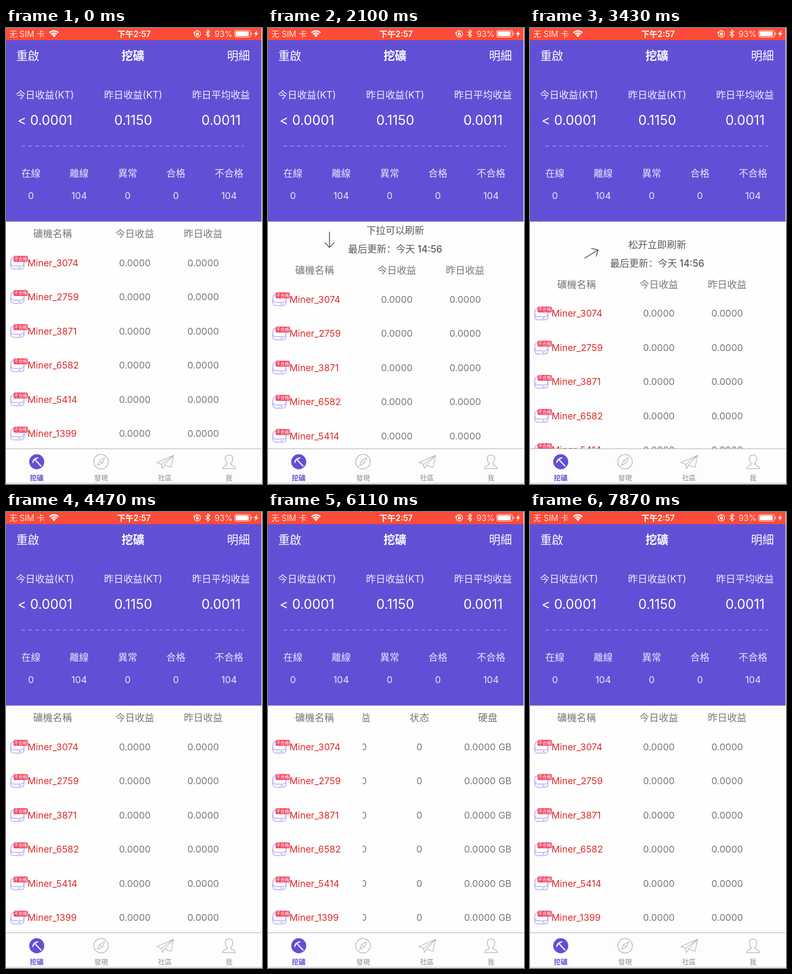
These frames come from a looping animation (483x861 px, 8 s). An HTML page with a canvas:

```html
<!DOCTYPE html>
<html lang="zh">
<head>
<meta charset="utf-8">
<title>挖礦</title>
<style>
html, body { margin: 0; width: 100%; height: 100%; overflow: hidden; background: #fff; }
canvas { display: block; width: 483px; height: 861px; }
</style>
</head>
<body>
<canvas id="stage" width="483" height="861"></canvas>
<script>
const ctx = document.getElementById('stage').getContext('2d');
const FONT = 'Inter, "Noto Sans CJK SC", "Noto Sans CJK TC", "Noto Sans CJK", sans-serif';
const LOOP = 8000, START = 1350, STEP = 148.2;
const PURPLE = '#6150d6', GREY = '#777', LINE = '#a2a2a2';
const BAR_END = 23, TABLE_TOP = 365.5, TAB_TOP = 794.5, NAME_EDGE = 178.5, COL = 129, END = -471;

const MINERS = [3074, 2759, 3871, 6582, 5414, 1399];
const COLUMNS = [
  ['今日收益', '0.0000'], ['昨日收益', '0.0000'], ['状态', '0'], ['硬盘', '0.0000 GB'],
  ['上行', '0.0000 Mbps'], ['同IP设备', '0'],
];

// Motion keys: [time, value]
const PULL = [
  [1250, 0], [1350, 6], [1650, 34], [1940, 60], [2090, 69], [2240, 69], [2390, 36], [2535, 9], [2660, 0],
  [2900, 0], [2980, 12], [3280, 72], [3424, 95.5], [3570, 110], [3700, 108], [3860, 69],
  [4050, 69], [4165, 52], [4315, 12], [4440, 0],
];
const SCROLL = [
  [4700, 0], [4906, -70], [5055, -140], [5203, -42], [5350, 7], [5500, 2], [5620, 0],
  [5760, 0], [5944, -80], [6240, -350], [6390, END], [6990, END], [7130, -400], [7430, -90], [7640, 0],
];

function at(keys, t) {
  if (t <= keys[0][0]) return keys[0][1];
  for (let i = 1; i < keys.length; i++) {
    const [t0, a] = keys[i - 1], [t1, b] = keys[i];
    if (t <= t1) return a + (b - a) * (t - t0) / (t1 - t0);
  }
  return keys[keys.length - 1][1];
}

const smooth = p => { p = Math.max(0, Math.min(1, p)); return p * p * (3 - 2 * p); };

// cy is the optical middle of the line
function text(s, x, cy, size, color, weight = 400, align = 'center') {
  ctx.font = `${weight} ${size}px ${FONT}`;
  ctx.textAlign = align;
  ctx.fillStyle = color;
  ctx.fillText(s, x, cy + size * 0.37);
}

function rect(x, y, w, h, color, r = 0) {
  ctx.fillStyle = color;
  ctx.beginPath();
  ctx.roundRect(x, y, w, h, r);
  ctx.fill();
}

function stroke(path, color, width) {
  ctx.strokeStyle = color;
  ctx.lineWidth = width;
  ctx.stroke(new Path2D(path));
}

function fill(path, color) {
  ctx.fillStyle = color;
  ctx.fill(new Path2D(path));
}

function circle(x, y, r) {
  ctx.beginPath();
  ctx.arc(x, y, r, 0, Math.PI * 2);
}

function place(x, y, draw) {
  ctx.save();
  ctx.translate(x, y);
  draw();
  ctx.restore();
}

function clipped(x, y, w, h, draw) {
  ctx.save();
  ctx.beginPath();
  ctx.rect(x, y, w, h);
  ctx.clip();
  draw();
  ctx.restore();
}

function statusBar() {
  rect(0, 0, 482, BAR_END, '#fc4b38');
  text('无 SIM 卡', 6, 11, 15.3, '#ffe3df', 400, 'left');
  ctx.strokeStyle = '#fff';
  ctx.lineWidth = 2.6;
  ctx.lineCap = 'butt';
  for (const r of [11.5, 7.4]) {
    ctx.beginPath();
    ctx.arc(90.5, 17, r, -Math.PI * 0.76, -Math.PI * 0.24);
    ctx.stroke();
  }
  fill('M90.5 17.4 L87 13.4 Q90.5 10.6 94 13.4Z', '#fff');
  text('下午2:57', 241.5, 11, 15.3, '#fff', 600);

  ctx.strokeStyle = '#fff';
  ctx.lineWidth = 1.3;
  ctx.beginPath();
  ctx.arc(361, 11, 6, -2.2, 3.4);
  ctx.stroke();
  fill('M353 7.5 L358.5 6.5 L355.5 11.5Z', '#fff');
  rect(358.4, 10, 5.2, 4, '#fff', 0.6);
  stroke('M359.5 10 V8.8 A1.5 1.5 0 0 1 362.5 8.8 V10', '#fff', 1);
  stroke('M376.8 6.8 L384.5 14 L380.7 17.6 V3.4 L384.5 7 L376.8 14.2', '#fff', 1.3);
  text('93%', 410.5, 11, 15.3, '#ffe9e5');
  ctx.strokeStyle = '#ffd0c8';
  ctx.lineWidth = 1.2;
  ctx.beginPath();
  ctx.roundRect(431.5, 4.5, 29.5, 12.8, 3);
  ctx.stroke();
  rect(433.3, 6.3, 24.5, 9.2, '#fff', 1.5);
  rect(462.4, 8.6, 1.8, 4.6, '#ffd0c8', 1);
  fill('M474 4.5 L467.5 11.8 H471.3 L469.6 17.4 L476 9.8 H472.2Z', '#fff');
}

function summary() {
  rect(0, BAR_END, 482, TABLE_TOP - BAR_END, PURPLE);
  text('重啟', 41, 52, 21.6, '#fff');
  text('挖礦', 239.5, 52, 21.6, '#fff', 600);
  text('明細', 438.5, 52, 21.6, '#fff');
  const top = [['今日收益(KT)', '< 0.0001', 73.5], ['昨日收益(KT)', '0.1150', 240], ['昨日平均收益', '0.0011', 405.7]];
  for (const [label, value, x] of top) {
    text(label, x, 126, 18.2, '#f1effc');
    text(value, x, 173.3, 25.2, '#fff');
  }
  ctx.setLineDash([7, 6]);
  stroke('M29 223 H449', 'rgba(255,255,255,.55)', 1.2);
  ctx.setLineDash([]);
  const counts = [['在線', 0, 47], ['離線', 104, 138], ['異常', 0, 229.5], ['合格', 0, 320.5], ['不合格', 104, 420.7]];
  for (const [label, value, x] of counts) {
    text(label, x, 274, 18, '#e9e6fa');
    text(value, x, 316, 17.6, '#e9e6fa');
  }
}

function pullHeader(t, pull) {
  const busy = t > 3850 && t < 4060;
  const hint = busy ? '正在刷新数据中...' : pull > 69.5 ? '松开立即刷新' : '下拉可以刷新';
  text(hint, 240, pull + 313.5, 18.2, '#5a5a5a', 500);
  text('最后更新：今天 ' + (t < 4060 ? '14:56' : '14:57'), 240, pull + 348.5, 18, '#5a5a5a', 500);
  place(116, pull + 331, () => {
    ctx.lineCap = 'round';
    if (t < 3850) {
      ctx.rotate(-Math.PI * smooth((t - 3270) / 250));
      stroke('M0 -14.5 V14 M-8.5 5.5 L0 14.5 L8.5 5.5', '#666', 1.8);
    } else {
      const head = Math.floor(t / 83);
      for (let i = 0; i < 12; i++) {
        ctx.globalAlpha = 0.25 + 0.6 * ((i - head % 12 + 12) % 12) / 11;
        stroke('M0 -6 V-12', '#777', 2.2);
        ctx.rotate(Math.PI / 6);
      }
    }
  });
}

function minerIcon(y) {
  place(0, y, () => {
    ctx.lineCap = 'round';
    stroke('M15 -9.5 H28 Q34 -8.5 34 -2 V1 Q33.5 6 28 6 H15 Q9 6 9 0.5 V-2 Q9 -9 15 -9.5Z', '#b3a9ef', 1.5);
    stroke('M9 0 V6 Q9.5 12 15.5 12 H27.5 Q33.5 12 34 6 V0', '#b3a9ef', 1.5);
    stroke('M24.5 9 H26.5', '#8f82e6', 1.5);
    rect(14.3, -13, 26.8, 11.2, '#f04a67', 2.5);
    text('不合格', 27.6, -7.5, 8.3, '#fff');
  });
}

function table(t) {
  const pull = at(PULL, t), shift = at(SCROLL, t);
  const headY = 388.5 + pull, rowY = i => 443.3 + 64.5 * i + pull;
  clipped(0, TABLE_TOP, 483, TAB_TOP - TABLE_TOP, () => {
    if (pull > 0) pullHeader(t, pull);
    text('礦機名稱', 88, headY, 18.3, GREY);
    MINERS.forEach((id, i) => {
      minerIcon(rowY(i));
      text('Miner_' + id, 40.5, rowY(i), 17.5, '#dc2a2a', 400, 'left');
    });
    clipped(NAME_EDGE, TABLE_TOP, 304, TAB_TOP - TABLE_TOP, () => {
      COLUMNS.forEach(([label, value], c) => {
        const x = 243 + COL * c + shift;
        text(label, x, headY, 18.3, GREY);
        MINERS.forEach((_, i) => text(value, x, rowY(i), 17.6, GREY));
      });
    });
  });
}

function tabBar() {
  rect(0, TAB_TOP, 482, 64, '#fdfdfd');
  rect(0, 794, 482, 1, '#acacac');
  rect(0, 858, 483, 3, '#e6e6e6');

  circle(58, 819, 14.2);
  ctx.fillStyle = PURPLE;
  ctx.fill();
  ctx.lineCap = 'round';
  stroke('M55.5 816 L66 827', '#fff', 2.2);
  fill('M49.5 821 Q50 812 60.5 810.5 L61.5 812.3 Q53 814.5 51 821.5Z', '#fff');

  circle(179.3, 819, 13.7);
  ctx.strokeStyle = LINE;
  ctx.lineWidth = 1.1;
  ctx.stroke();
  ctx.lineJoin = 'round';
  stroke('M186 812 L181.8 821.5 L172.8 826 L177 816.5Z M177 816.5 L181.8 821.5', LINE, 1);
  stroke('M316 807 L284.5 820.5 L293.5 824 L316 807 L311.5 829.5 L299 825.5 L316 807 M293.5 824 L295 832 L299 825.5', LINE, 1);
  stroke('M417.5 822 Q413.5 818.5 413.7 812.5 Q414.5 806 420.8 806 Q427 806 427.8 812.5 Q428 818.5 424 822 Q424 825 427 826 Q432.8 827.5 432.8 832 H408.8 Q408.8 827.5 414.5 826 Q417.5 825 417.5 822Z', LINE, 1.1);

  text('挖礦', 58, 849, 12.9, PURPLE, 600);
  [['發現', 179.5], ['社區', 300], ['我', 420.7]].forEach(([s, x]) => text(s, x, 849, 12.9, '#8c8c8c'));
}

function player(t) {
  const now = t / 1000 + 0.8, sec = Math.floor(now), x = 101 + 273 * now / 25;
  const clock = s => '00:' + String(s).padStart(2, '0');
  const back = ctx.createLinearGradient(4, 0, 476, 0);
  back.addColorStop(0, '#9895ad');
  back.addColorStop(0.2, '#9a98b0');
  back.addColorStop(0.21, '#a0a0a1');
  back.addColorStop(1, '#a0a0a0');
  rect(4, 821, 472, 31, back, 7);
  rect(22, 829, 4.2, 15, '#fff', 0.5);
  rect(29.5, 829, 4.2, 15, '#fff', 0.5);
  text(clock(sec), 69, 836.7, 12.8, '#fff', 500);
  rect(101, 835.2, 273, 2.8, '#c4c4c4', 1.4);
  rect(101, 835.2, x - 101, 2.8, '#fff', 1.4);
  rect(x - 1.5, 829, 3, 15, '#fff', 1);
  text('−' + clock(25 - sec), 402, 836.7, 12.8, '#fff', 500);
  fill('M439 833.5 H442 L447 829.5 V844 L442 840 H439Z', '#fff');
  ctx.lineCap = 'round';
  stroke('M449.5 834 Q451.5 836.7 449.5 839.5 M452.5 832 Q456 836.7 452.5 841.5 M455.8 830 Q460.8 836.7 455.8 843.5', '#fff', 1.4);
  const arrow = 'M270.8 798.5 V811.5 L273.7 808.8 L275.8 813.8 L278 812.8 L275.9 808 H280Z';
  stroke(arrow, '#fff', 2);
  fill(arrow, '#000');
}

function draw(t) {
  rect(0, 0, 483, 861, '#fefefe');
  statusBar();
  summary();
  table(t);
  tabBar();
  if (t > 6200 && t < 7500) player(t);
}

function tick(now) {
  const t = now % LOOP;
  draw(t < START ? 0 : START + STEP * Math.floor((t - START) / STEP));
  requestAnimationFrame(tick);
}
draw(0);
requestAnimationFrame(tick);
</script>
</body>
</html>
```
